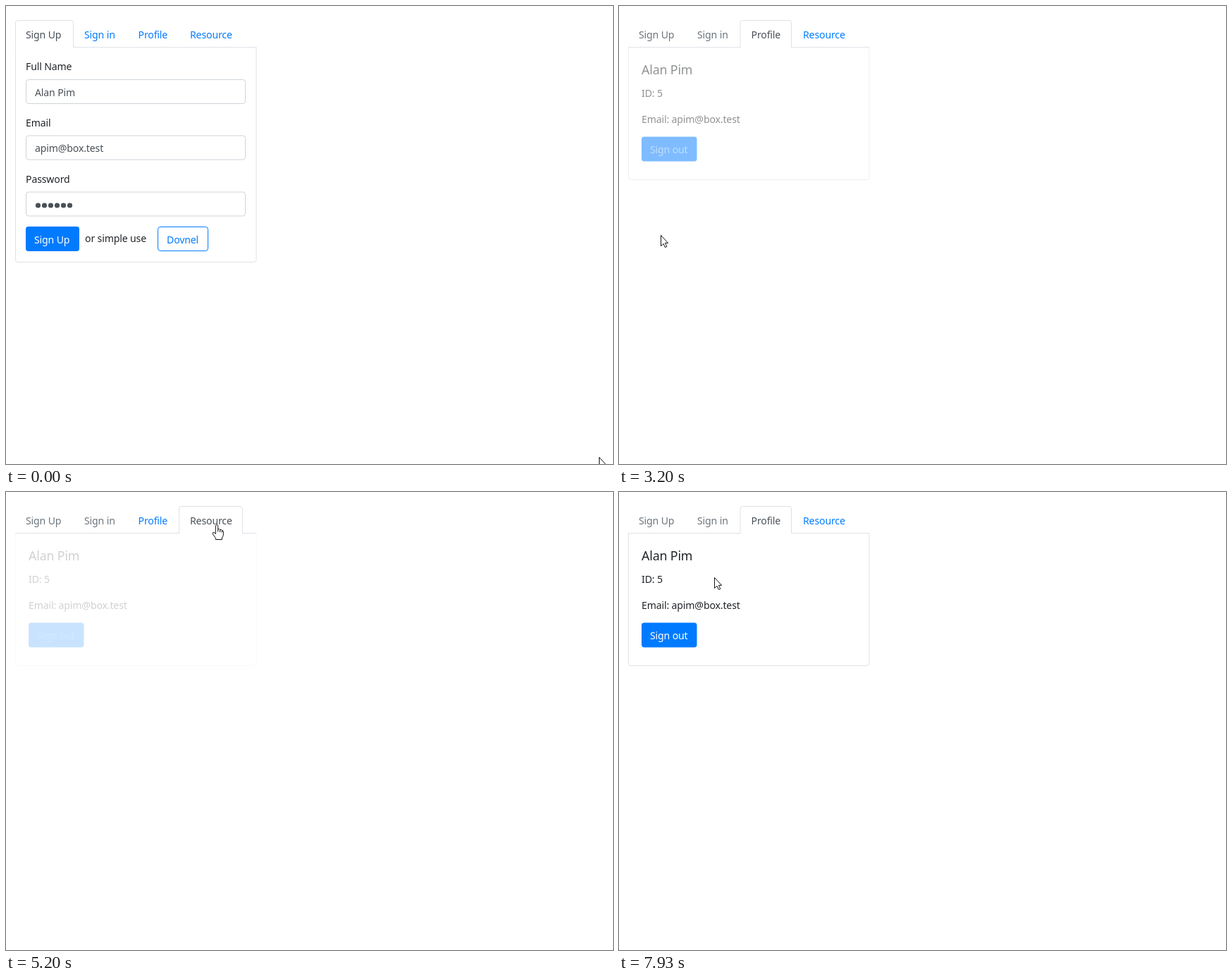
An HTML page with a canvas that plays this animation: 861x650 px, repeating every 8 s.

```html
<!DOCTYPE html>
<html lang="en">
<head>
<meta charset="utf-8">
<title>Sign up demo</title>
<style>
html, body { margin: 0; width: 100%; height: 100%; overflow: hidden; background: #fff; }
canvas { display: block; }
</style>
</head>
<body>
<canvas id="stage" width="861" height="650"></canvas>
<script>
const ctx = document.getElementById('stage').getContext('2d');
const LOOP = 8000;
const NAME = 'Alan Pim', MAIL = 'apim@box.test';
const BLUE = '#007bff', DARK = '#212529', INPUT = '#495057', MUTED = '#6c757d', LINE = '#dee2e6';

// When the views change
const SIGNED = 2600, STACK_END = 3070, OPEN_RESOURCE = 5000, REPLY = 6470, OPEN_PROFILE = 7330;

const TABS = [
  { label: 'Sign Up', x: 13.5, right: 95.5, tx: 28 },
  { label: 'Sign in', x: 96.5, right: 171.5, tx: 111 },
  { label: 'Profile', x: 172, right: 244.5, tx: 187.5 },
  { label: 'Resource', x: 245.5, right: 335.5, tx: 261 }
];

// time, x, y, easing of the move that ends here
const smooth = p => p * p * (3 - 2 * p);
const easeIn = p => p * p;
const easeOut = p => 1 - (1 - p) * (1 - p);
const linear = p => p;
const PATH = [
  [0, 841, 640], [50, 841, 640], [830, 59, 329, smooth],
  [3050, 59, 329], [3150, 59, 325, smooth], [3810, 59, 325],
  [4670, 296, 69, smooth], [4800, 298.5, 46, easeOut],
  [5300, 298.5, 46], [5530, 256, 59, easeIn], [5980, 73.5, 165, easeOut],
  [6550, 73.5, 165], [7130, 206, 65, smooth], [7200, 211, 52, easeOut],
  [7420, 211, 52], [7920, 135, 121, smooth], [LOOP, 135, 121]
];

const ramp = (t, from, span) => Math.min(1, Math.max(0, (t - from) / span));

function pointer(t) {
  const i = PATH.findIndex(k => k[0] > t);
  const a = PATH[i - 1], b = PATH[i];
  const p = (b[3] || linear)((t - a[0]) / (b[0] - a[0]));
  return { x: a[1] + (b[1] - a[1]) * p, y: a[2] + (b[2] - a[2]) * p };
}

function inside(p, x, y, w, h) {
  return p.x >= x && p.x <= x + w && p.y >= y && p.y <= y + h;
}

function text(str, x, y, color = DARK, size = 14.1) {
  ctx.font = `${size}px "Noto Sans", "Open Sans", sans-serif`;
  ctx.letterSpacing = size < 12 ? '-0.1px' : '-0.15px';
  ctx.fillStyle = color;
  ctx.fillText(str, x, y);
}

function box(x, y, w, h, r, fill, stroke, width = 1) {
  ctx.beginPath();
  ctx.roundRect(x, y, w, h, r);
  if (fill) { ctx.fillStyle = fill; ctx.fill(); }
  if (stroke) { ctx.strokeStyle = stroke; ctx.lineWidth = width; ctx.stroke(); }
}

function button(label, x, y, w, hover = 0, ring = 0) {
  if (ring) box(x - 1.5, y - 1.5, w + 3, 38, 5, null, `rgba(38,143,255,${0.5 * ring})`, 3);
  box(x, y, w, 35, 3.7, `rgb(0,${123 - 18 * hover},${255 - 38 * hover})`);
  text(label, x + 12, y + 23.7, '#fff');
}

function field(label, y, value) {
  text(label, 28, y);
  box(28.5, y + 13.5, 311, 34, 3.7, '#fff', '#ced4da');
  if (value) text(value, 41, y + 36.5, INPUT);
}

function card(bottom) {
  ctx.beginPath();
  ctx.moveTo(13.5, 59);
  ctx.arcTo(13.5, bottom, 20, bottom, 3.5);
  ctx.arcTo(355, bottom, 355, 59, 3.5);
  ctx.lineTo(355, 59);
  ctx.strokeStyle = LINE;
  ctx.lineWidth = 1;
  ctx.stroke();
}

function signUpPane(t) {
  card(t < SIGNED ? 363.5 : 370.5);
  field('Full Name', 91, NAME);
  field('Email', 170.5, MAIL);
  field('Password', 250.5);
  ctx.fillStyle = INPUT;
  for (let i = 0; i < 6; i++) {
    ctx.beginPath();
    ctx.arc(45.5 + 9 * i, 283, 3.6, 0, 2 * Math.PI);
    ctx.fill();
  }
  button('Sign Up', 28, 313, 76, ramp(t, 740, 130), ramp(t, 2180, 150));
  text('or simple use', 112, 335);
  box(215.5, 313.5, 71, 34, 3.7, '#fff', BLUE);
  text('Dovnel', 228, 336.7, BLUE);
}

function profilePane(t) {
  ctx.save();
  if (t < STACK_END) ctx.translate(0, 312);
  card(246.5);
  text(NAME, 32, 96.5, DARK, 17.8);
  text('ID: 5', 32, 128.5);
  text('Email: ' + MAIL, 32, 165.5);
  button('Sign out', 32, 185.5, 78.5);
  ctx.restore();
}

function resourcePane(t) {
  const replied = t >= REPLY;
  card(replied ? 247.5 : 204.5);
  field('Resource ID', 91, '1');
  button('Request', 28, 153.5, 76.5, ramp(t, 5870, 150), ramp(t, 6270, 150));
  if (replied) {
    text('Resource: { "id": 1, "version": 0, "type": "HIGH_VALUE",', 28, 210, '#17a2b8', 11.3);
    text('"name": "Resource #1" }', 28, 228, '#17a2b8', 11.3);
  }
}

function activeTab(t) {
  if (t < SIGNED) return 0;
  return t >= OPEN_RESOURCE && t < OPEN_PROFILE ? 3 : 2;
}

function tabOutline(tab, color) {
  ctx.beginPath();
  ctx.moveTo(tab.x, 59);
  ctx.arcTo(tab.x, 20.5, tab.x + 8, 20.5, 3.5);
  ctx.arcTo(tab.right, 20.5, tab.right, 30, 3.5);
  ctx.lineTo(tab.right, 59);
  ctx.strokeStyle = color;
  ctx.stroke();
}

function tabs(t, p) {
  const active = activeTab(t);
  ctx.lineWidth = 1;
  ctx.fillStyle = LINE;
  ctx.fillRect(13, 58, 342.5, 1);
  TABS.forEach((tab, i) => {
    const off = t >= SIGNED && i < 2;
    const hover = !off && inside(p, tab.x, 20, tab.right - tab.x, 38);
    let color = off ? MUTED : hover ? '#0056b3' : BLUE;
    if (i === active) {
      color = INPUT;
      ctx.fillStyle = '#fff';
      ctx.fillRect(tab.x, 57, tab.right - tab.x, 3);
      tabOutline(tab, LINE);
    } else if (hover) {
      tabOutline(tab, '#e9ecef');
    }
    text(tab.label, tab.tx, 46, color);
  });
}

function panes(t) {
  const show = (pane, alpha) => {
    if (alpha <= 0) return;
    ctx.globalAlpha = alpha;
    pane(t);
    ctx.globalAlpha = 1;
  };
  if (t < 2930) show(signUpPane, 1 - ramp(t, SIGNED, 330));
  else if (t < OPEN_RESOURCE) show(profilePane, ramp(t, 2900, 600));
  else if (t < 5255) show(profilePane, 1 - ramp(t, OPEN_RESOURCE, 255));
  else if (t < OPEN_PROFILE) show(resourcePane, ramp(t, 5255, 250));
  else if (t < 7580) show(resourcePane, 1 - ramp(t, OPEN_PROFILE, 250));
  else show(profilePane, ramp(t, 7580, 250));
}

const ARROW = new Path2D('M.5 .5V15.6L4 12.4L6.4 17.6L8.8 16.5L6.4 11.4H10.6Z');
const HAND = new Path2D('M-1.7 1.8Q0-1 1.7 1.8V7Q3.7 5.7 4.6 7.6Q6.6 6.7 7.3 8.6Q9.4 8.2 9.4 10.8V14Q9.2 17 7.4 19V21.5H-1.5V19.5L-5.6 13.8Q-6.4 11-4.1 11L-1.7 13.5Z');
const KNUCKLES = new Path2D('M1.7 7V10.5M4.6 7.6V11M7.3 8.6V11.5');
const BEAM = new Path2D('M-3-7.5H-1L0-6.5L1-7.5H3M0-6.5V6.5M-3 7.5H-1L0 6.5L1 7.5H3');

function cursorKind(t, p) {
  const onTab = i => inside(p, TABS[i].x, 20, TABS[i].right - TABS[i].x, 38);
  if (t < SIGNED + 330) return inside(p, 28, 313, 76, 35) ? 'hand' : 'arrow';
  if (onTab(2) || onTab(3)) return 'hand';
  if (t > 5255 && t < 7580) {
    if (inside(p, 28, 153, 77, 35)) return 'hand';
    if (inside(p, 28, 104, 312, 35)) return 'beam';
  }
  return 'arrow';
}

function cursor(t, p) {
  const kind = cursorKind(t, p);
  ctx.save();
  ctx.translate(Math.round(p.x), Math.round(p.y));
  ctx.strokeStyle = '#111';
  ctx.fillStyle = '#fff';
  ctx.lineWidth = 1;
  ctx.lineJoin = 'round';
  if (kind === 'beam') {
    ctx.stroke(BEAM);
  } else {
    const shape = kind === 'hand' ? HAND : ARROW;
    ctx.fill(shape);
    ctx.stroke(shape);
    if (kind === 'hand') ctx.stroke(KNUCKLES);
  }
  ctx.restore();
}

function draw(t) {
  const p = pointer(t);
  ctx.fillStyle = '#fff';
  ctx.fillRect(0, 0, 861, 650);
  panes(t);
  tabs(t, p);
  cursor(t, p);
}

const start = performance.now();
function tick() {
  draw((performance.now() - start) % LOOP);
  requestAnimationFrame(tick);
}
tick();
</script>
</body>
</html>
```
